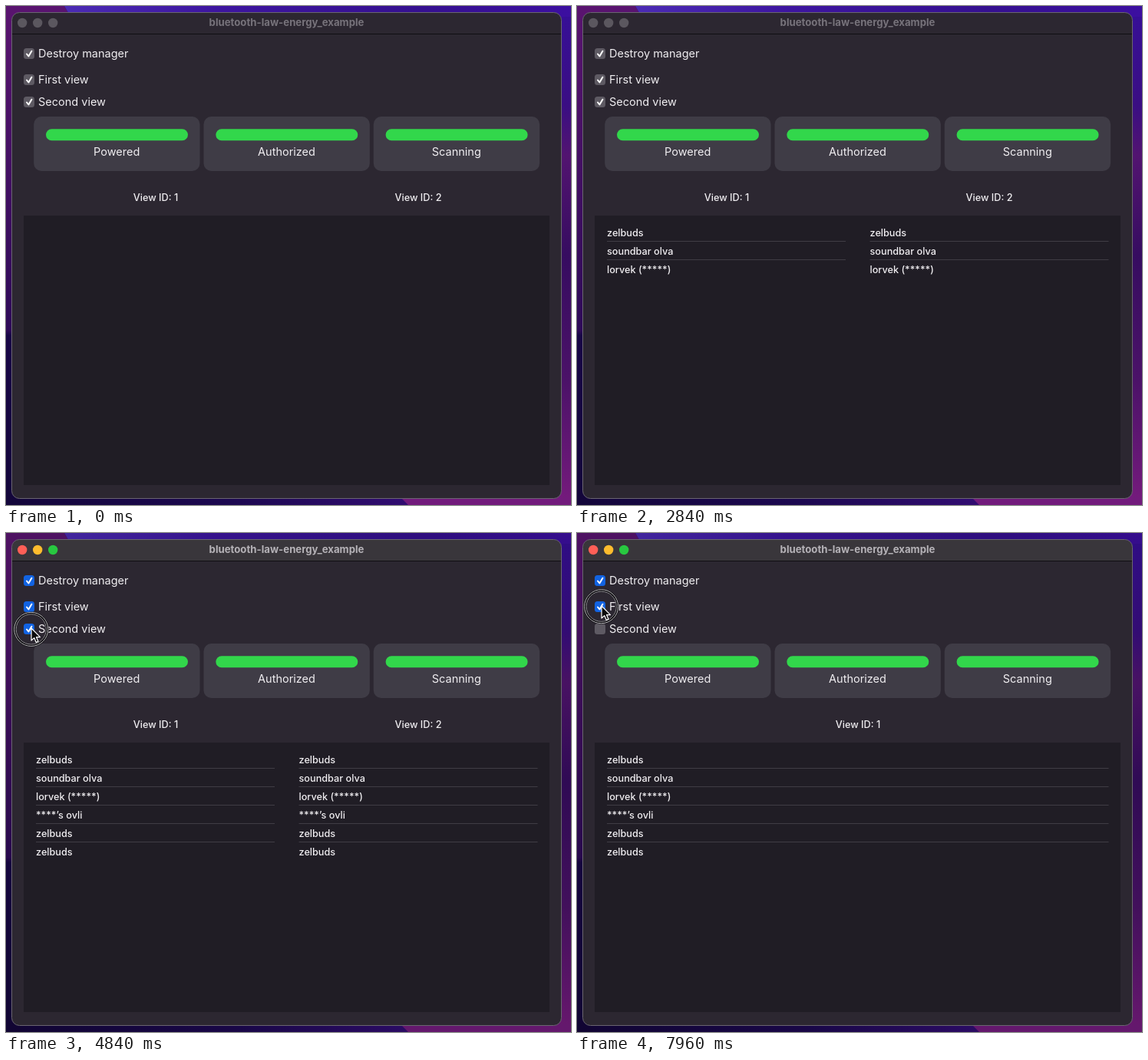
An HTML page for the animation above (8 s loop, 736x650 px).

```html
<!DOCTYPE html>
<html lang="en">
<head>
<meta charset="utf-8">
<title>Device scanner</title>
<style>
  html, body { margin: 0; width: 100%; height: 100%; overflow: hidden; background: #1c0850; }
  svg { display: block; }
  text { font-family: Inter, "Open Sans", sans-serif; fill: #f0eef1; }
  .label { font-size: 14.5px; }
  .small { font-size: 12.7px; font-weight: 500; }
  .title { font-size: 13.2px; font-weight: 700; }
  .middle { text-anchor: middle; }
  .line { stroke: #403d45; }
  .tick { fill: none; stroke: #fff; stroke-width: 2; stroke-linecap: round; stroke-linejoin: round; }
</style>
</head>
<body>
<svg width="736" height="650" viewBox="0 0 736 650">
  <defs>
    <linearGradient id="topEdge">
      <stop offset="0" stop-color="#4b2bb4"/><stop offset=".3" stop-color="#3d159f"/>
      <stop offset=".7" stop-color="#35108f"/><stop offset="1" stop-color="#3c0fa0"/>
    </linearGradient>
    <linearGradient id="leftEdge" x2="0" y2="1">
      <stop offset="0" stop-color="#59146f"/><stop offset=".3" stop-color="#451064"/>
      <stop offset=".65" stop-color="#2e0a58"/><stop offset=".66" stop-color="#180646"/>
      <stop offset="1" stop-color="#13063a"/>
    </linearGradient>
    <linearGradient id="rightEdge" x2="0" y2="1">
      <stop offset="0" stop-color="#360f98"/><stop offset=".2" stop-color="#3a0e83"/>
      <stop offset=".3" stop-color="#521470"/><stop offset=".5" stop-color="#360c60"/>
      <stop offset=".75" stop-color="#4b1268"/><stop offset="1" stop-color="#761b7d"/>
    </linearGradient>
    <linearGradient id="bottomEdge">
      <stop offset="0" stop-color="#13063a"/><stop offset=".4" stop-color="#1c0850"/>
      <stop offset=".7" stop-color="#300c70"/>
    </linearGradient>
  </defs>

  <rect width="736" height="650" fill="url(#bottomEdge)"/>
  <rect width="20" height="650" fill="url(#leftEdge)"/>
  <rect x="716" width="20" height="650" fill="url(#rightEdge)"/>
  <path d="M514 640H736V650H524Z" fill="#721b7c"/>
  <path d="M0 0H76L84 14H0Z" fill="#59146f"/>
  <path d="M76 0H736V14H84Z" fill="url(#topEdge)"/>
  <rect id="shadow" width="736" height="650" fill="#000" opacity=".12"/>

  <rect x="7.5" y="8.5" width="716" height="633" rx="10" fill="#2c2731"/>
  <path id="bar" d="M8 37V19a10 10 0 0 1 10-10H713.5a10 10 0 0 1 10 10V37Z"/>
  <path d="M8 36.5H723" stroke="#100e12"/>
  <rect x="7.5" y="8.5" width="716" height="633" rx="10" fill="none" stroke="#6a6570"/>
  <g id="lights"></g>
  <text id="title" class="title middle" x="365.5" y="26.3">bluetooth-law-energy_example</text>
  <g id="checks"></g>
  <g id="cards"></g>
  <rect x="23" y="273" width="685" height="351" fill="#201d25"/>
  <g id="views"></g>

  <g id="press" fill="none">
    <circle r="21" stroke="#0c0b0e" stroke-width="4"/>
    <circle r="22" stroke="#b9b7bc" stroke-width="1"/>
    <circle r="19.6" stroke="#a09da4" stroke-width=".9"/>
  </g>
  <path id="cursor" d="M0 0V16L3.7 12.6L6.3 18.4L9 17.2L6.5 11.6H11.5Z"
        fill="#0b0b0c" stroke="#fff" stroke-width="1.2" stroke-linejoin="round"/>
</svg>

<script>
const LOOP = 8000;
const ACTIVATE = 4640;
const UNCHECK = 4960;
const DEVICES = [
  ['zelbuds', 160], ['soundbar olva', 480], ['lorvek (*****)', 1480],
  ['****’s ovli', 3200], ['zelbuds', 4040], ['zelbuds', 4400],
];
// start, end, center x and y of the ring around a held pointer
const PRESSES = [[4760, 4960, 32.8, 125.4], [7840, 8000, 31.7, 95.7]];
// time, x, y of the pointer tip
const POINTER = [
  [3480, 250, 420], [3800, 103, 190], [4000, 103, 190], [4560, 33, 124],
  [5400, 33, 124], [6300, 29, 110], [6900, 29, 110], [7560, 32, 95], [8000, 32, 95],
];
const $ = id => document.getElementById(id);
const show = (node, on) => node.setAttribute('visibility', on ? 'visible' : 'hidden');
const text = (x, y, content, style) => `<text x="${x}" y="${y}" class="${style}">${content}</text>`;

$('cards').innerHTML = ['Powered', 'Authorized', 'Scanning'].map((name, i) => {
  const x = 36.2 + 221.3 * i;
  return `<rect x="${x}" y="144" width="216.3" height="71" rx="10" fill="#3f3c46"/>
    <rect x="${x + 15.8}" y="160.3" width="185" height="15" rx="7.5" fill="#32d74b"/>` +
    text(x + 108, 195, name, 'label middle');
}).join('');

function checkbox(name, y, checked, active) {
  const fill = checked && active ? '#1263e2' : '#5e5a63';
  const tick = checked ? `<path class="tick" d="M27 ${y + .5}l2.4 3 4-6.8"/>` : '';
  return `<rect x="23" y="${y - 7}" width="14" height="14" rx="3.5" fill="${fill}"/>` +
    tick + text(42, y + 5.2, name, 'label');
}

function view(id, left, right, center, names) {
  const rows = names.map((name, i) => {
    const y = 300 + 24 * i;
    const line = i ? `<path class="line" d="M${left} ${y - 17.5}H${right}"/>` : '';
    return line + text(left, y, name, 'small');
  });
  return text(center, 254, 'View ID: ' + id, 'small middle') + rows.join('');
}

function drawWindow(active, split, names) {
  show($('shadow'), active);
  $('bar').setAttribute('fill', active ? '#39363b' : '#2c2731');
  $('title').style.fill = active ? '#b5b2b7' : '#77737b';
  $('lights').innerHTML = ['#ff5f57', '#febc2e', '#28c840'].map((color, i) =>
    `<circle cx="${21.2 + 20 * i}" cy="22" r="6.2" fill="${active ? color : '#5b575f'}"/>`).join('');
  $('checks').innerHTML = checkbox('Destroy manager', 62, true, active) +
    checkbox('First view', 96, true, active) +
    checkbox('Second view', 125, split, active);
  $('views').innerHTML = split
    ? view(1, 39, 350, 195, names) + view(2, 381.5, 692.5, 537, names)
    : view(1, 39, 692.5, 366, names);
}

function pointerAt(time) {
  const next = Math.max(1, POINTER.findIndex(point => point[0] > time));
  const [t0, x0, y0] = POINTER[next - 1];
  const [t1, x1, y1] = POINTER[next];
  const u = (time - t0) / (t1 - t0);
  const ease = u * u * (3 - 2 * u);
  return [x0 + (x1 - x0) * ease, y0 + (y1 - y0) * ease];
}

let lastState = '';
function frame() {
  const time = performance.now() % LOOP;
  const active = time >= ACTIVATE;
  const split = time < UNCHECK;
  const names = DEVICES.filter(device => time >= device[1]).map(device => device[0]);
  const state = [active, split, names.length].join();
  if (state !== lastState) drawWindow(active, split, names);
  lastState = state;

  const visible = time >= POINTER[0][0];
  show($('cursor'), visible);
  if (visible) $('cursor').setAttribute('transform', `translate(${pointerAt(time)})`);

  const press = PRESSES.find(([start, end]) => time >= start && time < end);
  show($('press'), press);
  if (press) $('press').setAttribute('transform', `translate(${press[2]},${press[3]})`);
  requestAnimationFrame(frame);
}
frame();
</script>
</body>
</html>
```
